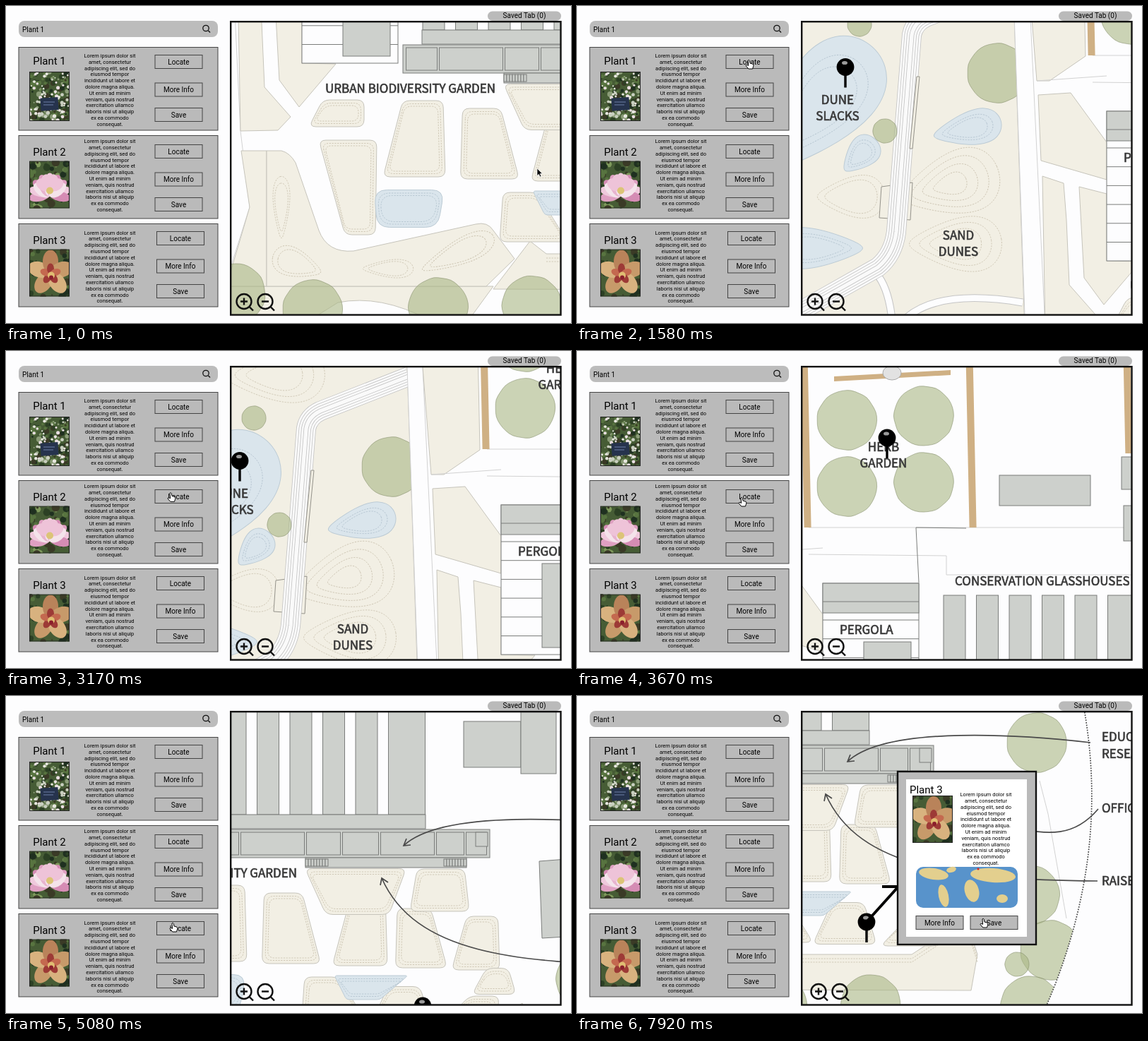
Animation, 800 px wide and 449 px high, one loop 8 s. Source, as an HTML page:

```html
<!DOCTYPE html>
<html lang="en">
<head>
<meta charset="utf-8">
<title>Plant locator</title>
<style>
  html, body { margin: 0; height: 100%; overflow: hidden; background: #fdfdfe; }
  svg { display: block; width: 100vw; height: 100vh; }
  text { font-family: Roboto, sans-serif; font-size: 10px; }
  .mid { text-anchor: middle; }
  .title { font-size: 15px; }
  .lorem { font-size: 7.5px; text-anchor: middle; }
  .label { font: 500 17px "Noto Sans CJK JP", "Noto Sans CJK SC", "Noto Sans", sans-serif; fill: #383838; stroke: #383838; stroke-width: .65; }
  .soil { fill: #f2efe4; stroke: #c6c4bb; }
  .water { fill: #dae5ec; stroke: #bccbd5; }
  .dash { fill: none; stroke: #cbc3b0; stroke-width: .9; stroke-dasharray: 2.2 1.6; }
  .wet { stroke: #b3c3cf; }
  .roof { fill: #cdd0cc; stroke: #7b7d7b; }
  .frame { fill: none; stroke: #7b7d7b; }
  .deck { fill: #f2efe4; stroke: #94928a; }
  .wall { fill: #cfb084; }
  .thin { fill: none; stroke: #d2d2d2; }
  .arrow { fill: none; stroke: #4a4a4a; stroke-width: 1.7; }
  .tree { fill: rgba(170,183,133,.6); stroke: rgba(130,138,105,.55); }
  .btn { fill: #bababa; stroke: #444; }
  .ink { fill: none; stroke: #111; stroke-width: 2.4; }
</style>
</head>
<body>
<svg id="stage" viewBox="0 0 800 449"></svg>
<script>
const repeat = (n, make) => Array.from({ length: n }, (_, i) => make(i)).join('');
const shape = (cls, d) => `<path class="${cls}" d="${d}"/>`;
const poly = (cls, pts) => `<polygon class="${cls}" points="${pts}"/>`;
const line = (cls, pts, dy = 0) => `<polyline class="${cls}" points="${pts}" transform="translate(0 ${dy})"/>`;
const rect = (cls, x, y, w, h, extra = '') =>
  `<rect class="${cls}" x="${x}" y="${y}" width="${w}" height="${h}" ${extra}/>`;
const band = (d, width, color) => `<path d="${d}" fill="none" stroke="${color}" stroke-width="${width}"/>`;
const text = (cls, x, y, s) => `<text class="${cls}" x="${x}" y="${y}">${s}</text>`;
const label = (x, y, s) => text('label', x, y + 6.2, s);
const label2 = (x, y, a, b) => text('label mid', x, y - 5, a) + text('label mid', x, y + 17.5, b);
const ellipse = (x, y, rx, ry, turn, fill) =>
  `<ellipse rx="${rx}" ry="${ry}" fill="${fill}" transform="translate(${x} ${y}) rotate(${turn})"/>`;
const circle = (x, y, r, fill) => ellipse(x, y, r, r, 0, fill);

// Closed polygon with corners rounded by up to r.
function rounded(points, r) {
  const towards = (a, b) => {
    const k = Math.min(.5, r / Math.hypot(b[0] - a[0], b[1] - a[1]));
    return [a[0] + (b[0] - a[0]) * k, a[1] + (b[1] - a[1]) * k];
  };
  const n = points.length;
  return points.map((p, i) => {
    const from = towards(p, points[(i + n - 1) % n]), to = towards(p, points[(i + 1) % n]);
    return `${i ? 'L' : 'M'}${from}Q${p} ${to}`;
  }).join('') + 'Z';
}

// Rounded trapezoid with dotted inner edges; taper is top width over bottom width.
function bed(x, y, w, h, lean = 0, taper = .65, cls = 'soil', r = 10) {
  const outline = inset => {
    const a = w / 2 - inset, b = h / 2 - inset;
    const top = a * Math.min(1, taper), bottom = a * Math.min(1, 1 / taper);
    const slide = (a - Math.min(top, bottom)) * lean, st = taper < 1 ? slide : 0, sb = taper < 1 ? 0 : slide;
    return rounded([[x - top + st, y - b], [x + top + st, y - b], [x + bottom + sb, y + b], [x - bottom + sb, y + b]], r);
  };
  const dots = cls === 'water' ? 'dash wet' : 'dash';
  return shape(cls, outline(0)) + shape(dots, outline(4.5)) + shape(dots, outline(8));
}

// Egg whose narrow end points left before turning.
function egg(cls, x, y, rx, ry, turn) {
  const points = Array.from({ length: 24 }, (_, i) => {
    const a = i * Math.PI / 12;
    return [rx * Math.cos(a), ry * Math.sin(a) * (1 + .5 * Math.cos(a))];
  });
  return `<path class="${cls}" d="${rounded(points, 99)}" transform="translate(${x} ${y}) rotate(${turn})"/>`;
}
const rings = (n, cls, x, y, rx, ry, turn = 0) =>
  repeat(n, i => egg(cls, x, y, rx * (1 - i * .22), ry * (1 - i * .22), turn));
const pond = (x, y, rx, ry, turn) => egg('water', x, y, rx, ry, turn) + rings(2, 'dash wet', x, y, rx * .75, ry * .7, turn);

function tree(x, y, r = 42) {
  const points = Array.from({ length: 22 }, (_, i) => {
    const a = i * Math.PI / 11, d = r * (1.015 + .02 * Math.sin(i * 2.7 + x));
    return [x + d * Math.cos(a), y + d * Math.sin(a)];
  });
  return shape('tree', rounded(points, 99));
}
const pin = (x, y) => band(`M${x},${y}v29`, 3.4, '#000') + circle(x, y, 12.4, '#000') + ellipse(x - 1, y - 6, 4, 2.6, 0, '#9a9a9a');

function duneGarden() {
  const boardwalk = 'M288,-313L163,-264Q146,-256 143,-239L121,40Q117,72 95,90L-20,155';
  const trail = 'M92,98Q112,120 116,175M125,172Q170,118 300,140';
  return poly('soil', '-80,-450 282,-450 286,-326 303,180 -80,180') +
    band(trail, 11, '#c4c4c4') + band(trail, 9, '#fdfdfe') +
    pond(9, -135, 118, 58, -48) + pond(70, -69, 31, 20, -45) + pond(222, -106, 49, 23, -12) + pond(9, 63, 65, 27, 180) +
    rings(4, 'dash', 197, -27, 72, 42, -15) + rings(2, 'dash', 57, -10, 48, 28) +
    rings(3, 'dash', 205, 57, 66, 36) + rings(3, 'dash', 98, -315, 72, 36) +
    poly('deck', '100,-24 144,-30 141,23 97,20') +
    repeat(4, i => band(boardwalk, 28 - 7 * i, '#c2c2c2') + band(boardwalk, 26.4 - 7 * i, '#fafafa')) +
    poly('deck', '150,-180 154,-180 144,-78 140,-78') +
    tree(264, -185) + tree(105, -103, 17) + tree(69, -254, 17) +
    shape('thin', 'M286,-450V-326L303,157L290,440H318V370L345,285L332,177L308,-326V-450Z" style="fill:#fdfdfe');
}

function herbGarden() {
  return poly('soil', '302,-450 384,-450 389,-209 338,-174 320,-174 308,-326') +
    poly('soil', '322,-154 368,-157 419,-87 419,-34 326,-61') +
    poly('soil', '328,-39 358,-29 362,23 366,115 403,157 385,176 332,177') +
    poly('soil', '380,-24 419,-14 419,81 467,82 415,143 387,105') +
    line('thin', '320,-174 419,-181') + line('thin', '399,-210 860,-210') +
    line('thin', '399,-172 594,-170 594,-143 880,-143') + line('frame', '555,-132 551,-210 622,-209') +
    [[393, 230], [627, 230], [848, 125]].map(([x, h]) => rect('wall', x, -440, 10, h, `transform="skewX(1.2) translate(${h > 200 ? 4 : 6})"`)).join('') +
    poly('wall', '435,-424 600,-433 600,-426 435,-417') +
    `<ellipse cx="517" cy="-429" rx="13" ry="10" fill="#e2e2e2" stroke="#aaa"/>` +
    repeat(4, i => tree(453 + 109 * (i % 2), -362 + 94 * (i >> 1) - 6 * (i % 2))) +
    rect('roof', 669, -284, 129, 43) + rect('roof', 842, -310, 40, 46) + rect('roof', 845, -241, 40, 50);
}

function buildings() {
  const rooms = [565, 612, 705, 756, 810, 889, 931, 963];
  const pergola = rect('frame', 419, -131, 136, 212, 'style="fill:#fdfdfe"') + rect('roof', 419, -131, 136, 42) +
    line('frame', '419,-105 555,-105') + repeat(6, i => line('frame', '419,-79 555,-79', 26.7 * i)) + rect('roof', 477, -48, 67, 119);
  const glasshouses = repeat(6, i => rect('roof', 590 + 46.5 * i, -114, i < 5 ? 31 : 52, 148)) + rect('roof', 589, 34, 286, 20);
  const stairs = x => repeat(8, i => rect('roof', x + i * 4, 97, 4, 10));
  return pergola + glasshouses + rect('roof', 562, 55, 404, 40) +
    repeat(7, i => rect('roof', rooms[i] + 1.5, 59, rooms[i + 1] - rooms[i] - 3, 32)) +
    rect('roof', 946, 59, 17, 20) + rect('roof', 705, 95, 228, 14) + stairs(705) + stairs(901) +
    rect('roof', 929, -98, 81, 65) + rect('roof', 1010, -140, 50, 116) + poly('roof', '1036,100 1088,96 1091,206 1040,209');
}

function biodiversityGarden() {
  const edge = 'M1160,-80C1205,80 1200,230 1139,391C1110,465 1080,520 1046,566';
  const terrace = '765,351 935,351 1012,301 1028,351';
  const beds =
    bed(468, 152, 78, 38, 1, .75) + bed(484, 257, 82, 134, .9, 1.9) +
    repeat(5, i => bed(578 + 112 * i - 5 * i * i, 188 + 7 * i, 88 - 5 * i, 108 - 8 * i, (-1) ** i * .8)) +
    bed(776, 143, 143, 65, .1, 1.6) + bed(895, 141, 84, 60, .2, .8) +
    repeat(3, i => bed(747 + 93 * i, 299 + 8 * i, 96 - 6 * i, 70 - 11 * i, i - .8, .5)) + bed(972, 270, 62, 37, .3, .5);
  const trees = tree(325, 407) + tree(434, 430) + repeat(3, i => tree(612 + 132.5 * i, 427 - 2.5 * i)) +
    tree(1112, 51) + tree(1102, 267) + tree(1131, 345) + tree(1103, 424) +
    repeat(2, i => tree(1008 - 106 * i, 484 + 47 * i)) + tree(1086, 318, 17) + tree(1084, 365, 17) + tree(950, 516, 17);
  return shape('soil', 'M290,397H690L655,445H600Q530,408 470,420L430,445H290Z') +
    poly('soil', '333,205 369,205 369,397 312,397 345,285') +
    shape('soil', 'M369,205H390Q402,208 410,222L443,318Q455,350 492,347L665,309Q682,305 690,318L720,358L680,397H369Z') +
    rings(2, 'dash', 390, 285, 44, 11, -90) + rings(2, 'dash', 412, 365, 36, 19, 200) +
    rings(2, 'dash', 541, 372, 36, 12) + rings(2, 'dash', 640, 350, 56, 17, -25) +
    poly('soil', `690,401 742,333 ${terrace} 1019,402`) + line('dash', terrace, 6) + line('dash', terrace, 11) +
    beds + bed(571, 287, 99, 53, -.4, 1.15, 'water', 18) + bed(798, 279, 104, 34, -.4, 2.2, 'water', 4) +
    shape('soil', 'M770,566Q870,504 1001,504L890,566Z') +
    line('thin', '1001,504 1132,437') + line('thin', '1116,105 1128,152 1154,300') + trees +
    `<path d="${edge}L1300,566V-80Z" fill="#fdfdfe"/>` + shape('arrow" stroke-dasharray="1.8', edge) +
    shape('arrow', 'M1188,51C1100,41 900,25 844,78M848,68L844,78L854,77') +
    shape('arrow', 'M1198,247C1000,245 860,230 813,124M811,134L813,124L822,130') +
    shape('arrow', 'M1199,145C1165,185 1130,182 1076,171M1084,167L1076,171L1082,178');
}

const labels = () => label(452, 117, 'URBAN BIODIVERSITY GARDEN') + label(606, -134, 'CONSERVATION GLASSHOUSES') +
  label(443, -65, 'PERGOLA') + label2(505, -313, 'HERB', 'GARDEN') + label2(38, -136, 'DUNE', 'SLACKS') + label2(209, 56, 'SAND', 'DUNES') +
  label(1204, 43, 'EDUCATION') + label(1204, 67, 'RESEARCH') + label(1204, 144, 'OFFICES') + label(1204, 247, 'RAISED BEDS');

let seed = 7;
const random = n => (seed = (seed * 16807) % 2147483647) / 2147483647 * n;
const specks = (n, colors, size) =>
  repeat(n, i => circle(random(57), random(70), 1 + random(size), colors[i % colors.length]));

// Petals fanned evenly over a sweep of degrees, centred on straight up.
function petals(n, x, y, reach, width, sweep, colors) {
  return repeat(n, i => {
    const turn = (i / n - .5 + .5 / n) * sweep - 90, a = turn * Math.PI / 180;
    return ellipse(x + reach / 2 * Math.cos(a), y + reach / 2 * Math.sin(a), reach / 2, width, turn, colors[i % colors.length]);
  });
}
const foliage = ['#2c4024', '#587440', '#3a3a26', '#1f3020'];
const artwork = [
  () => specks(140, [...foliage, '#8b9c78'], 3) + specks(75, ['#e8e8e0', '#c9cfc0', '#eadfe2'], 1.8) +
    '<rect x="16" y="37" width="25" height="18" fill="#26334d" transform="rotate(-4 28 46)"/>' + band('M20,43h16M20,47h14', 1, '#6c7fa6'),
  () => specks(60, [...foliage, '#7f9a5c'], 5) + petals(9, 29, 47, 30, 7, 230, ['#dfa0c2', '#efc9dc', '#d58cb4']) +
    petals(5, 29, 50, 28, 8, 130, ['#f4e3ea', '#e7b3ce']) + petals(4, 29, 40, 22, 8, -150, ['#eec3d8']) + circle(29, 42, 5, '#dcc477'),
  () => specks(60, foliage, 5) + petals(5, 30, 34, 33, 11, 360, ['#c79a6a', '#d8b27f', '#b9835a']) +
    petals(5, 30, 35, 15, 5, 360, ['#9d3a36', '#c4694f']) + circle(31, 37, 5, '#e0bd72') + circle(31, 40, 3, '#8b1f2c')
];
function photo(n) {
  const h = n === 1 ? 70 : 67;
  return `<svg id="photo${n}" width="57" height="${h}"><rect width="57" height="70" fill="#465c35"/>${artwork[n - 1]()}
    <rect x=".5" y=".5" width="56" height="${h - 1}" fill="none" stroke="#222"/></svg>`;
}

const loremLines = ['Lorem ipsum dolor sit', 'amet, consectetur', 'adipiscing elit, sed do', 'eiusmod tempor',
  'incididunt ut labore et', 'dolore magna aliqua.', 'Ut enim ad minim', 'veniam, quis nostrud',
  'exercitation ullamco', 'laboris nisi ut aliquip', 'ex ea commodo', 'consequat.'];
const lorem = (x, y) => loremLines.map((s, i) => text('lorem', x, y + i * 8.79, s)).join('');

const hotspots = [];
function button(x, y, s, popup = false) {
  hotspots.push({ x, y, popup });
  return rect('btn', x, y, 67, 19) + text('mid', x + 33.5, y + 13, s);
}
function card(i) {
  const top = 58.5 + 125 * i, x = i < 2 ? 211 : 213.5, y = top + (i ? 13 : 11);
  return rect('btn', 18, top, 282, 117.5) + text('title mid', 61.5, top + (i ? 28 : 24.5), 'Plant ' + (i + 1)) +
    `<use href="#photo${i + 1}" x="33" y="${top + (i ? 36 : 34.5)}"/>` + lorem(147, top + [14.5, 10.8, 15.2][i]) +
    button(x, y - (i === 2 ? 2 : 0), 'Locate') + button(x, y + 39.5 - (i === 2 ? 2 : 0), 'More Info') + button(x, y + 75 - (i === 2 ? 2 : 0), 'Save');
}
const magnifier = (x, sign) => `<circle class="ink" cx="${x}" cy="418.5" r="10.5"/>` +
  shape('ink', `M${x + 8},426.5l5,5M${x - 5},418.5h10${sign === '+' ? `M${x},413.5v10` : ''}`);

const landMass = () => [[505, 252, 21, 8, 8], [530, 246, 7, 4, -15], [519, 283, 7, 16, -12], [559, 276, 10, 16, -15],
  [589, 254, 32, 10, 4], [602, 287, 8, 6, 0]].map(e => ellipse(...e, '#e3cf8e')).join('');
const popup = () => band('M410,320L455,270M432,270H455V290', 4, '#000') +
  rect('', 454, 107, 196, 245, 'fill="#bababa" stroke="#111" stroke-width="2.4"') + rect('', 466, 118, 171, 223, 'fill="#fff"') +
  text('title', 471, 138, 'Plant 3') + '<use href="#photo3" x="475" y="141"/>' + lorem(579, 142.3) +
  rect('', 480, 242, 144, 58, 'rx="10" fill="#5893cb"') + landMass() + circle(568, 245, 1.5, '#d22') +
  button(480, 311.5, 'More Info', true) + button(557, 311.5, 'Save', true);

document.getElementById('stage').innerHTML = `
  <defs>${photo(1) + photo(2) + photo(3)}
    <clipPath id="window"><rect x="319" y="23" width="466" height="414"/></clipPath></defs>
  <rect width="800" height="449" fill="#fdfdfe"/>
  <rect x="18" y="21" width="282" height="23" rx="8" fill="#bcbcbc"/>${text('', 23, 36.8, 'Plant 1')}
  ${band('M286.5,35l2.5,2.5', 1.4, '#111')}<circle cx="283" cy="31.5" r="4.2" class="ink" style="stroke-width:1.3"/>
  ${repeat(3, card)}
  <rect x="682" y="7.5" width="104" height="13.5" rx="6.7" fill="#bababa"/>${text('mid', 734, 17, 'Saved Tab (0)')}
  <g clip-path="url(#window)"><g id="world">
    ${duneGarden() + herbGarden() + buildings() + biodiversityGarden() + labels()}
    ${pin(49, -193.5) + pin(510, -337) + pin(871, 305)}
  </g></g>
  <rect x="318.2" y="22.2" width="467.3" height="415.3" class="ink"/>
  <g id="zoom">${magnifier(337, '+') + magnifier(367, '-')}</g>
  <g id="popup">${popup()}</g>
  <path id="arrow" d="M0,0V10.5L2.4,8.3L4.1,12L5.9,11.2L4.2,7.6H7.4Z" fill="#000" stroke="#fff" stroke-width=".7"/>
  <path id="hand" d="M-1,0Q.5,-1.5 1.3,.3L2,4L6,5.2Q7.2,6 6.6,8.3L5.5,12H-.2L-4,7.6Q-4,6 -2,6.6L-.4,7.4Z" fill="#fff" stroke="#000"/>`;

// Cursor stops by arrival time; the map jumps to each view and follows the cursor during drags.
const stops = [
  { at: 0, x: 752, y: 230 },
  { at: 830, x: 243, y: 77 },
  { at: 2080, x: 480, y: 190 },
  { at: 2580, x: 431, y: 259, drag: true },
  { at: 3080, x: 233, y: 200 },
  { at: 3420, x: 233, y: 208 },
  { at: 4170, x: 600, y: 390 },
  { at: 4670, x: 390, y: 64, drag: true },
  { at: 5080, x: 236, y: 322 },
  { at: 6000, x: 388, y: 203 },
  { at: 6330, x: 421, y: 180 },
  { at: 7500, x: 575, y: 316 }
];
const views = [
  { at: 0, x: 0, y: 0 },
  { at: 1080, x: 331, y: 280 },
  { at: 3420, x: -71, y: 460 },
  { at: 5330, x: -449, y: -129 },
  { at: 6750, x: -461, y: 15 }
];
const TRAVEL = 500, POPUP_TIME = 6750, LOOP = 8000, STEP = 1000 / 12;

function travelled(i, t) {
  const from = stops[i - 1], to = stops[i], time = Math.min(TRAVEL, to.at - from.at);
  const p = Math.min(1, Math.max(0, 1 - (to.at - t) / time)), e = p * p * (3 - 2 * p);
  return { x: (to.x - from.x) * e, y: (to.y - from.y) * e };
}
function cursorAt(t) {
  let { x, y } = stops[0];
  for (let i = 1; i < stops.length; i++) { const d = travelled(i, t); x += d.x; y += d.y; }
  return { x, y };
}
function cameraAt(t) {
  const view = views.findLast(v => v.at <= t);
  let { x, y } = view;
  stops.forEach((stop, i) => {
    if (stop.drag && stop.at > view.at) { const d = travelled(i, t); x += d.x; y += d.y; }
  });
  return { x, y };
}

const el = Object.fromEntries(['world', 'zoom', 'popup', 'arrow', 'hand'].map(id => [id, document.getElementById(id)]));
const move = (node, { x, y }) => node.setAttribute('transform', `translate(${x} ${y})`);
const show = (node, on) => node.setAttribute('visibility', on ? 'visible' : 'hidden');

function draw(now) {
  const t = Math.floor((now % LOOP + 5) / STEP) * STEP + 3;
  const camera = cameraAt(t), cursor = cursorAt(t), open = t >= POPUP_TIME;
  const { x, y } = cursor;
  const overPin = Math.hypot(x - camera.x - 871, y - camera.y - 305) < 13;
  const hovering = overPin || hotspots.some(b => (open || !b.popup) && x > b.x && x < b.x + 67 && y > b.y && y < b.y + 19);
  move(el.world, camera);
  move(el.zoom, { x: open ? 5 : 0, y: 0 });
  move(el.arrow, cursor);
  move(el.hand, cursor);
  show(el.popup, open);
  show(el.hand, hovering);
  show(el.arrow, !hovering);
}
const start = performance.now();
(function tick() {
  draw(performance.now() - start);
  requestAnimationFrame(tick);
})();
</script>
</body>
</html>
```
